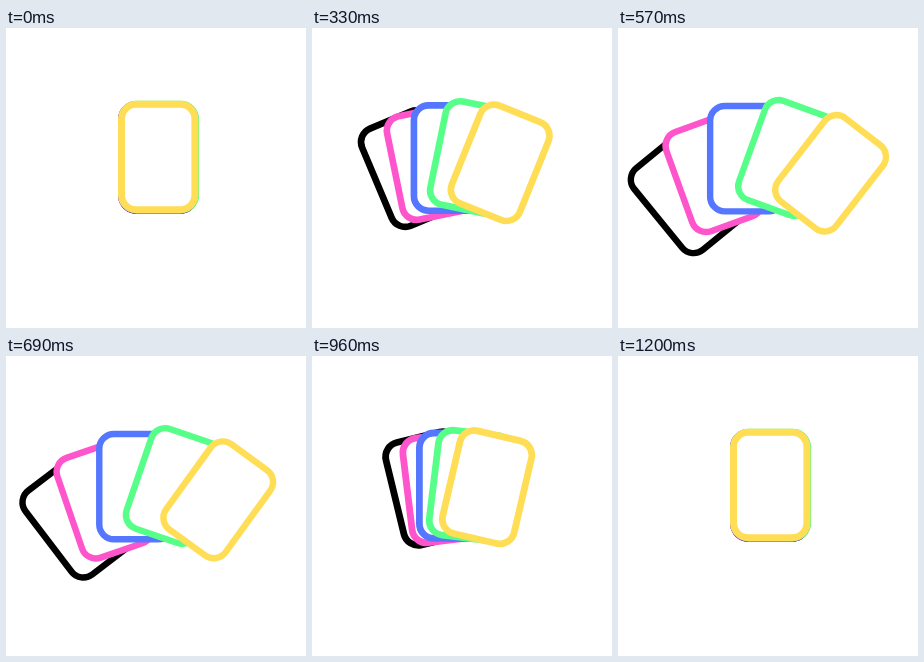
An HTML page for the animation above (1530 ms loop, 300 by 300 pixels).

```html
<!DOCTYPE html>
<html lang="en">
<head>
<meta charset="utf-8">
<title>Card fan</title>
<style>
  html, body { margin: 0; width: 100%; height: 100%; overflow: hidden; background: #fff; }
  svg { display: block; width: 100vw; height: 100vh; }
  rect { fill: #fff; }
</style>
</head>
<body>
<svg id="stage" viewBox="0 0 300 300"></svg>
<script>
const LOOP = 1530, SWING = 1200, STEP = 30;
const WIDTH = 73.4, HEIGHT = 105.4;

// x, y: [rest, linear, quadratic] offsets over the opening amount; turn in degrees
const cards = [
  { color: '#000',    x: [0, -104, 20],    y: [.6, -7, 45],  turn: -39.5 },
  { color: '#ff55cc', x: [0, -59.5, 2.8],  y: [.3, 2, 15],   turn: -20 },
  { color: '#5577ff', x: [0, -23.5, 0],    y: [.2, 1.5, 0],  turn: 0 },
  { color: '#55ff88', x: [.7, 15.7, 0],    y: [0, 1, 0],     turn: 20 },
  { color: '#ffdd55', x: [0, 62.5, 0],     y: [0, 1, 15.5],  turn: 38, drag: true }
];

const stage = document.getElementById('stage');
for (const card of cards) {
  card.el = document.createElementNS('http://www.w3.org/2000/svg', 'rect');
  const attrs = { x: -WIDTH / 2, y: -HEIGHT / 2, width: WIDTH, height: HEIGHT, rx: 14.7, stroke: card.color };
  for (const name in attrs) card.el.setAttribute(name, attrs[name]);
  stage.append(card.el);
}

const curve = ([a, b, c], p) => a + b * p + c * p * p;
const bump = (t, mid, spread) => Math.exp(-(((t - mid) / spread) ** 2));

// The front card trails a little on the way out and back
const drag = t => 2.1 * bump(t, 840, 170) - 4.2 * bump(t, 490, 90);

function draw(t) {
  const p = t < SWING ? (1 - Math.cos(2 * Math.PI * t / SWING)) / 2 : 0;
  for (const card of cards) {
    const x = 152.2 + curve(card.x, p) + (card.drag && p ? drag(t) : 0);
    const y = 129 + curve(card.y, p);
    card.el.setAttribute('transform', `translate(${x} ${y}) rotate(${card.turn * p})`);
    card.el.setAttribute('stroke-width', 7 - .6 * p);
  }
}

const start = performance.now();
function tick() {
  const t = (performance.now() - start) % LOOP;
  draw(Math.floor(t / STEP) * STEP);
  requestAnimationFrame(tick);
}
draw(0);
requestAnimationFrame(tick);
</script>
</body>
</html>
```
